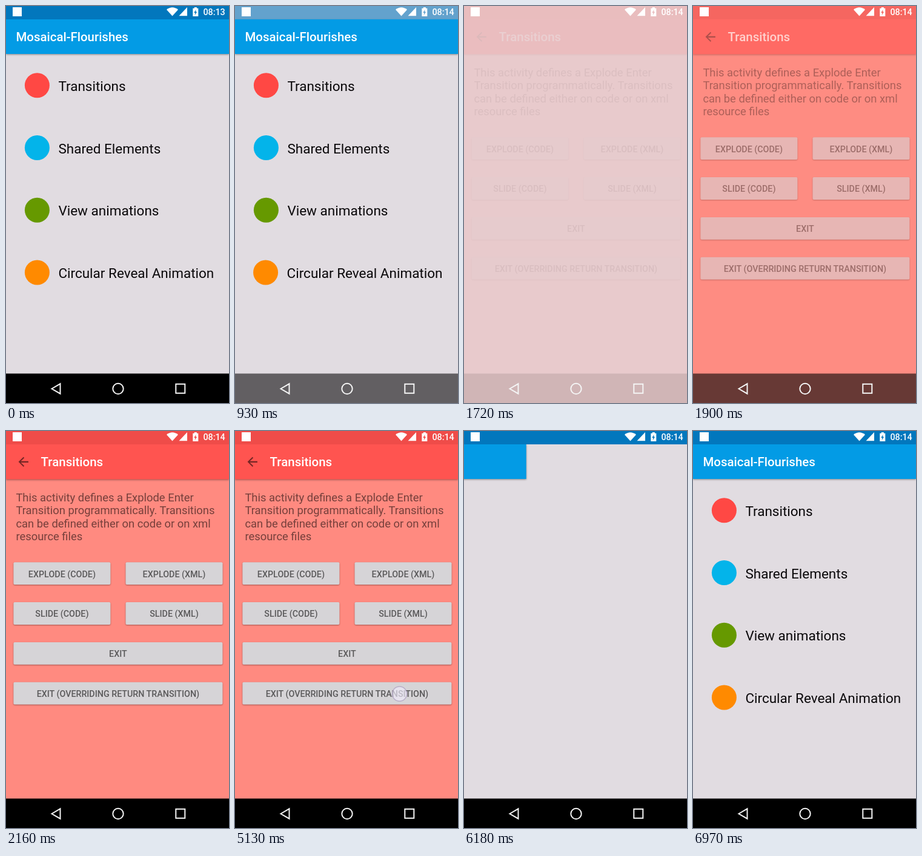
Recreate the animation shown at these times as an HTML page. Size 368 by 654 pixels, loop 8000 ms.

```html
<!DOCTYPE html>
<html lang="en">
<head>
<meta charset="utf-8">
<title>Screen transitions</title>
<style>
  html, body { margin: 0; width: 100%; height: 100%; overflow: hidden; background: #e1dce1; }
  svg { display: block; width: 100%; height: 100%; font-family: Roboto, sans-serif; }
  .title { font-size: 20.44px; font-weight: 500; fill: #fff; }
  .row text { font-size: 22.5px; fill: #0a080a; }
  .para { font-size: 18.4px; fill: rgba(0, 0, 0, .54); }
  .bar { filter: drop-shadow(0 1px 1.5px rgba(0, 0, 0, .4)); }
  .btn rect { fill: #d6d4d7; filter: drop-shadow(0 1px 1px rgba(0, 0, 0, .36)); }
  .btn text { font-size: 14.3px; font-weight: 500; fill: rgba(0, 0, 0, .58); text-anchor: middle; }
  .btn.pressed rect { fill: #cfcdd0; filter: drop-shadow(0 3px 2px rgba(0, 0, 0, .4)); }
  .clock { font-size: 14.3px; font-weight: 500; }
</style>
</head>
<body>
<svg viewBox="0 0 368 654">
  <defs>
    <clipPath id="listClip"><rect x="16" y="79" width="352" height="527"/></clipPath>
  </defs>
  <rect width="368" height="654" fill="#e1dce1"/>

  <g id="rows" clip-path="url(#listClip)"></g>
  <g id="homeBar">
    <rect class="bar" y="22" width="368" height="57" fill="#039be5"/>
    <text class="title" x="16.4" y="58.3">Mosaical-Flourishes</text>
  </g>
  <rect id="homeStatus" width="368" height="22" fill="#0277bd"/>

  <rect id="tint" width="368" height="654" fill="#ff8a80"/>
  <g id="detail">
    <g id="buttons"></g>
    <g id="para" class="para"></g>
    <g id="detailBar">
      <rect class="bar" y="22" width="368" height="57.5" fill="#ff5450"/>
      <path transform="translate(16.5 38.6) scale(1.022)" fill="#000" fill-opacity=".54"
        d="M20 11H7.83l5.59-5.59L12 4l-8 8 8 8 1.41-1.41L7.83 13H20z"/>
      <text class="title" x="57.6" y="58.3">Transitions</text>
    </g>
    <rect width="368" height="22" fill="#ef4c49"/>
  </g>

  <rect id="nav" y="605.5" width="368" height="48.5"/>
  <g fill="none" stroke="#f4f4f4" stroke-width="2">
    <path d="M75.5 630.5L89.5 622.3V638.7Z"/>
    <circle cx="185" cy="630.5" r="8.7"/>
    <rect x="280.3" y="622.8" width="15" height="15"/>
  </g>

  <g fill="#fff">
    <rect x="11" y="2" width="15" height="15"/>
    <path d="M265 6Q274.5-1.5 284 6L274.5 16.5Z"/>
    <path d="M299 2V16.3H285.5Z"/>
    <path fill-rule="evenodd" d="M308.3 3.7h2.5V2h4v1.7h2.5V17h-9ZM313.6 5.8l-3.4 5.4h2.1l-.7 4 3.6-5.6H313Z"/>
    <text id="clock" class="clock" x="325.4" y="15"></text>
  </g>
  <circle id="touch" r="12" fill="rgba(240,235,250,.66)" stroke="rgba(150,130,175,.5)" stroke-width="1.5"/>
</svg>

<script>
  const LOOP = 8000, STEP = 87.5, OFFSET = 490;
  const WIDTH = 372, HEIGHT = 654;
  const $ = id => document.getElementById(id);

  function add(parent, tag, attrs, text) {
    const el = document.createElementNS('http://www.w3.org/2000/svg', tag);
    for (const key in attrs) el.setAttribute(key, attrs[key]);
    if (text) el.textContent = text;
    return parent.appendChild(el);
  }

  const rows = [
    ['Transitions', '#ff4844'],
    ['Shared Elements', '#03b4ea'],
    ['View animations', '#669900'],
    ['Circular Reveal Animation', '#ff8a00']
  ].map(([label, color], i) => {
    const y = 130.7 + 102.75 * i;
    const row = add($('rows'), 'g', { class: 'row' });
    add(row, 'circle', { cx: 51.4, cy: y, r: 20.5, fill: color });
    add(row, 'text', { x: 86.4, y: y + 9.2 }, label);
    return row;
  });

  [
    'This activity defines a Explode Enter',
    'Transition programmatically. Transitions',
    'can be defined either on code or on xml',
    'resource files'
  ].forEach((line, i) => add($('para'), 'text', { x: 16.4, y: 115.6 + 21.57 * i }, line));

  function button(label, x, width, line) {
    const y = 216.3 + 65.8 * line;
    const group = add($('buttons'), 'g', { class: 'btn' });
    add(group, 'rect', { x, y, width, height: 36.8, rx: 2 });
    add(group, 'text', { x: x + width / 2, y: y + 24.2 }, label);
    return group;
  }
  const pairs = [
    button('EXPLODE (CODE)', 12.4, 160, 0), button('EXPLODE (XML)', 197.5, 160, 0),
    button('SLIDE (CODE)', 12.4, 160, 1), button('SLIDE (XML)', 197.5, 160, 1)
  ];
  const exit = button('EXIT', 12.4, 345, 2);
  const override = button('EXIT (OVERRIDING RETURN TRANSITION)', 12.4, 345, 3);

  // Staggered slides: [element, leave time, re-enter time] and [element, leave time, duration]
  const home = [
    [$('homeBar'), 1065, 6050],
    [rows[0], 1008, 6075],
    [rows[1], 975, 6095],
    [rows[2], 929, 6120],
    [rows[3], 904, 6140]
  ];
  const detail = [
    [$('detailBar'), 5432, 500],
    [$('para'), 5410, 500],
    [exit, 5351, 500],
    [override, 5330, 500],
    ...pairs.map(el => [el, 5325, 415])
  ];

  const progress = (t, start, length) => Math.min(1, Math.max(0, (t - start) / length));
  const smooth = (t, start, length) => (1 - Math.cos(Math.PI * progress(t, start, length))) / 2;
  const move = (el, x, y) => el.setAttribute('transform', `translate(${x.toFixed(2)} ${y.toFixed(2)})`);
  const fade = (id, value) => $(id).setAttribute('opacity', value.toFixed(3));

  function draw(t) {
    for (const [el, leave, enter] of home) {
      const away = t < 3000 ? progress(t, leave, 500) : 1 - progress(t, enter, 820);
      move(el, -WIDTH * away ** 2, 0);
    }
    for (const [el, leave, length] of detail) move(el, 0, HEIGHT * progress(t, leave, length) ** 2);

    const closed = t >= 5910;
    const barsOut = 1 - smooth(t, 790, 300);
    const contentIn = smooth(t, 1610, 500);
    fade('homeStatus', closed ? 1 : barsOut);
    fade('nav', Math.max(barsOut, contentIn));
    fade('detail', closed ? 0 : contentIn);
    fade('tint', smooth(t, 1622, 300) - smooth(t, 5345, 300));

    override.classList.toggle('pressed', t >= 5210 && !closed);
    $('clock').textContent = t < OFFSET ? '08:13' : '08:14';

    const first = t >= 660 && t < 835, second = t >= 5120 && t < 5210;
    $('touch').style.display = first || second ? '' : 'none';
    move($('touch'), first ? 171.5 : 271.5, first ? 133 : 433);
  }

  const begin = performance.now();
  function tick() {
    const t = (performance.now() - begin) % LOOP;
    draw(OFFSET + Math.floor((t - OFFSET) / STEP) * STEP);
    requestAnimationFrame(tick);
  }
  tick();
</script>
</body>
</html>
```
